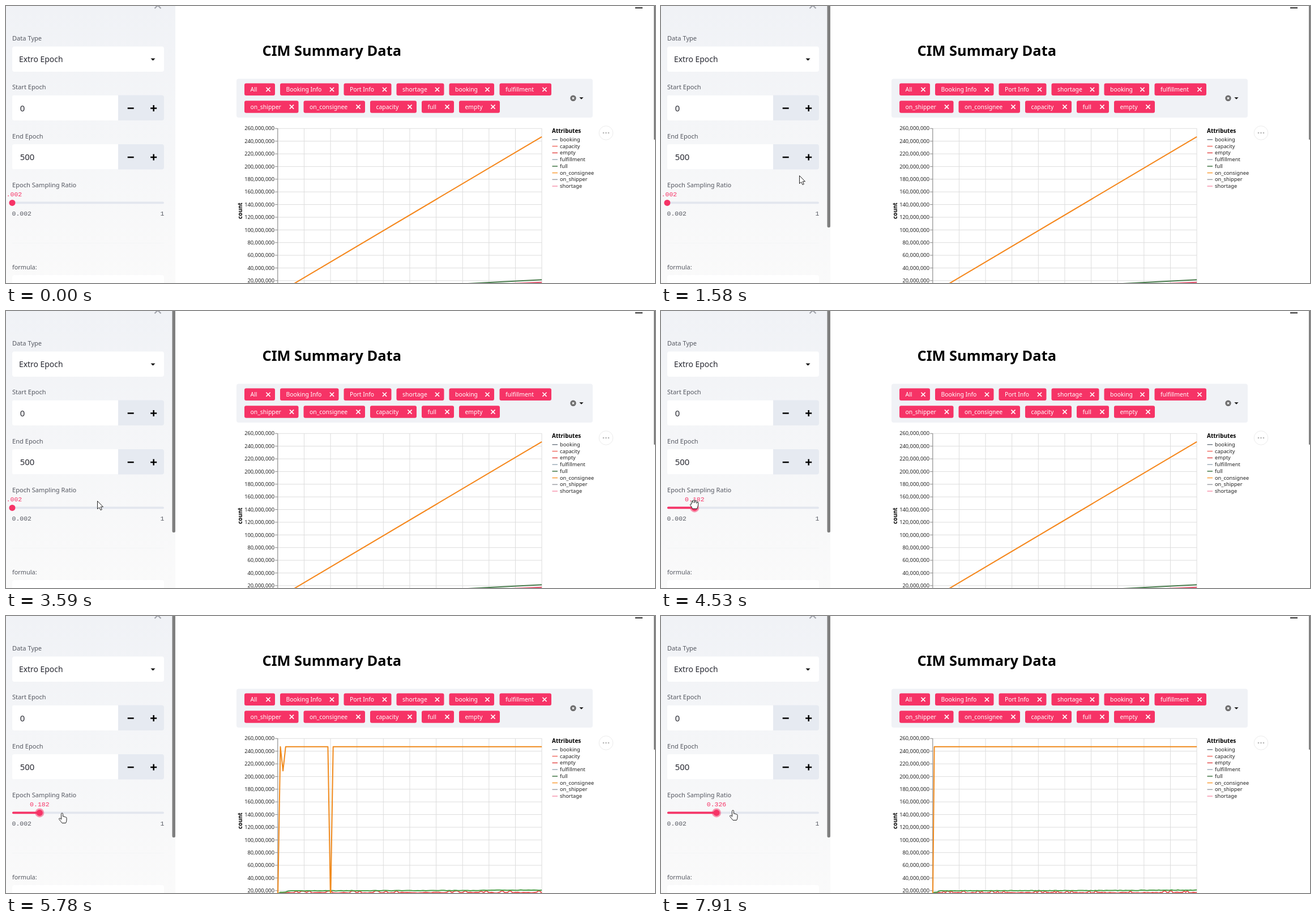
An HTML page that plays this animation: 1146 px wide and 489 px high, repeating every 8 s.

```html
<!DOCTYPE html>
<html lang="en">
<head>
<meta charset="utf-8">
<title>Summary dashboard</title>
<style>
html, body { margin: 0; width: 100%; height: 100%; overflow: hidden; background: #fff; }
svg { display: block; width: 100vw; height: 100vh; font-family: "Noto Sans", "Open Sans", sans-serif; }
.mono { font-family: "Liberation Mono", "DejaVu Sans Mono", monospace; }
</style>
</head>
<body>
<svg id="stage" viewBox="0 0 1146 489" preserveAspectRatio="none">
  <defs>
    <linearGradient id="side" x1="0" y1="0" x2="0" y2="1">
      <stop offset="0" stop-color="#f0f2f6"/><stop offset="1" stop-color="#fafafa"/>
    </linearGradient>
  </defs>
  <g id="page"></g>
  <g id="plot" fill="none" stroke-width="2" stroke-linejoin="round"></g>
  <g id="slider"></g>
  <g id="running"></g>
  <rect id="sidebarScroll" x="293.5" y="-6" width="5.5" height="397" rx="2.5" fill="#7f7f7f"/>
  <path id="cursor" stroke="#222" stroke-width="1" stroke-linejoin="round" fill="#fff"/>
</svg>
<script>
const LOOP = 8000;
const PINK = "#f63366";
const $ = id => document.getElementById(id);

// Markup helpers
const rect = (x, y, w, h, fill, r = 0) =>
  `<rect x="${x}" y="${y}" width="${w}" height="${h}" rx="${r}" fill="${fill}"/>`;
const line = (x1, y1, x2, y2, stroke, w = 1) =>
  `<path d="M${x1} ${y1}L${x2} ${y2}" stroke="${stroke}" stroke-width="${w}"/>`;
const text = (x, y, size, fill, s, more = "") =>
  `<text x="${x}" y="${y}" font-size="${size}" fill="${fill}" ${more}>${s}</text>`;
const cross = (x, y, r, stroke, w) =>
  line(x - r, y - r, x + r, y + r, stroke, w) + line(x - r, y + r, x + r, y - r, stroke, w);
const caret = (x, y, r) => `<path d="M${x - r} ${y - r / 2}h${2 * r}l${-r} ${r}z" fill="#111"/>`;

function numberInput(y, label, value) {
  const mid = y + 23;
  return text(11, y - 10.5, 11.1, "#555861", label)
    + rect(11, y, 268, 44.5, "#e6eaf1", 4)
    + `<path d="M198 ${y}H14q-3 0 -3 3v38.5q0 3 3 3H198z" fill="#fff"/>`
    + text(24.7, y + 28, 14.9, "#262730", value)
    + line(214.7, mid, 225.7, mid, "#000", 2.5)
    + line(255.2, mid, 266.2, mid, "#000", 2.5)
    + line(260.7, mid - 5.5, 260.7, mid + 5.5, "#000", 2.5);
}

function sidebar() {
  return rect(0, 0, 299, 489, "url(#side)")
    + `<path d="M262.5 4.300L268 -1.200L273.5 4.300" fill="none" stroke="#a3a6ad" stroke-width="2.2"/>`
    + text(11, 61, 11.1, "#555861", "Data Type")
    + rect(11, 71.5, 268, 44.5, "#fff", 4)
    + text(23, 99, 13.9, "#262730", "Extro Epoch")
    + caret(259.5, 94.5, 4)
    + numberInput(157.5, "Start Epoch", "0")
    + numberInput(244, "End Epoch", "500")
    + text(11, 319.5, 11.1, "#555861", "Epoch Sampling Ratio")
    + text(10.5, 370, 11.5, "#555861", "0.002", 'class="mono"')
    + text(279.5, 370, 11.5, "#555861", "1", 'class="mono" text-anchor="end"')
    + line(11, 418.5, 279, 418.5, "#f4f5f6")
    + text(11, 464.5, 10.9, "#555861", "formula:")
    + rect(11, 475, 268, 30, "#fff", 4);
}

function tag([x, right, label], top) {
  return rect(x, top, right - x, 21.5, PINK, 3)
    + text(x + 10.5, top + 14.5, 10.4, "#fff", label, 'font-weight="500"')
    + cross(right - 12, top + 10.8, 3.6, "#fff", 1.6);
}

const tagRows = [
  [[421, 475, "All"], [484, 587.5, "Booking Info"], [596.5, 680.5, "Port Info"],
   [689.5, 773.5, "shortage"], [782.5, 862, "booking"], [871.5, 963, "fulfillment"]],
  [[421, 516.5, "on_shipper"], [525.5, 634, "on_consignee"], [643, 725, "capacity"],
   [734, 791, "full"], [800, 872, "empty"]]
];

function filters() {
  return rect(407, 128.5, 629, 68.5, "#f0f2f6", 4)
    + tagRows.map((row, i) => row.map(t => tag(t, 136.5 + i * 30.7)).join("")).join("")
    + `<circle cx="1001.5" cy="162.7" r="5.2" fill="#6c6c6c"/>`
    + cross(1001.5, 162.7, 1.8, "#fff", 1.3)
    + caret(1016, 163, 3.6);
}

// Chart geometry: values are in millions
const LEFT = 479.8, WIDE = 466.3, ZERO = 507.2, UNIT = 22.38 / 20;
const chartY = v => ZERO - v * UNIT;

const legend = [
  ["booking", "#7d868f"], ["capacity", "#f0736a"], ["empty", "#e45756"], ["fulfillment", "#a3b2bd"],
  ["full", "#4a7d4e"], ["on_consignee", "#f9a13f"], ["on_shipper", "#a3a5ab"], ["shortage", "#f79db4"]
];

function chartFrame() {
  let s = "";
  for (let i = 0; i <= 10; i++) {
    const x = LEFT + i * WIDE / 10;
    s += line(x, 216, x, 489, "#ddd");
  }
  for (let v = 20; v <= 260; v += 20) {
    const y = chartY(v);
    s += line(LEFT, y, LEFT + WIDE, y, "#ddd") + line(475, y, LEFT, y, "#888")
      + text(474, y + 3.2, 9.3, "#222", v + ",000,000", 'text-anchor="end"');
  }
  s += line(LEFT, 216, LEFT, 489, "#888")
    + text(0, 0, 10, "#000", "count",
      'font-weight="700" text-anchor="middle" transform="translate(416.5 361.5) rotate(-90)"')
    + text(964, 224, 10, "#000", "Attributes", 'font-weight="700"');
  legend.forEach(([name, color], i) => {
    const y = 235.8 + i * 11.75;
    s += line(964.5, y, 974, y, color, 1.6) + text(978, y + 3.1, 9.3, "#222", name);
  });
  s += `<circle cx="1059.5" cy="224" r="12.3" fill="#fff" stroke="#ececec"/>`;
  for (const x of [1055, 1059.5, 1064]) s += `<circle cx="${x}" cy="224" r="1.3" fill="#b4b4b4"/>`;
  return s;
}

$("page").innerHTML = rect(0, 0, 1146, 489, "#fff") + sidebar()
  + text(452.5, 88, 25.4, "#000", "CIM Summary Data", 'font-weight="700"')
  + filters() + chartFrame()
  + line(1111, 3.3, 1124, 3.3, "#111", 1.8)
  + rect(1144, -4, 4, 240, "#7f7f7f", 1);

$("running").innerHTML =
  `<path d="M938 4.500h5l2.500 -3.500M940 -1l5 2l4 1v5M945 -2l5 2" fill="none" stroke="#9a9a9a" stroke-width="1.5"/>`
  + text(965, 3.5, 11.1, "#b3b3b3", "RUNNING...")
  + `<rect x="1033.5" y="-14" width="58" height="23" rx="3" fill="#fff" stroke="#ededed"/>`
  + text(1051, 3, 10.8, "#555861", "Stop");

const noise = (i, seed) => {
  const n = Math.sin(i * 12.9898 + seed * 78.233) * 43758.5453;
  return n - Math.floor(n);
};

function series(count, value, color) {
  let d = "";
  for (let i = 0; i <= count; i++)
    d += (i ? "L" : "M") + (LEFT + i * WIDE / count).toFixed(1) + " " + chartY(value(i, i / count)).toFixed(1);
  return `<path d="${d}" stroke="${color}"/>`;
}

function sampledPlot(count, dips) {
  const empty = (i, p) => i && 16 + noise(i, 2) * 1.2 + (noise(i, 5) > .86 ? 2.6 : 0) + p * .4;
  const full = (i, p) => i === 0 ? 15
    : i < 4 ? 17 + noise(i, 3) : 19.3 + noise(i, 1) * .7 + (p > .78 ? 1.1 : p * .8);
  const consignee = i => i === 0 ? 0 : i in dips ? dips[i] : 247;
  return series(count, empty, "#e45756") + series(count, full, "#4a9f48")
    + series(count, consignee, "#f08a1d");
}

const plots = [
  series(1, i => i * 17.4, "#e0506a") + series(1, i => i * 21.4, "#4a7d4e")
    + series(1, i => i * 247, "#f5861a"),
  sampledPlot(100, { 2: 209, 20: 0 }),
  sampledPlot(167, {})
];

function drawSlider(value, fillTo, active) {
  const at = v => 11 + 268 * (v - .002) / .998;
  const x = at(value);
  return rect(11, 345.6, 268, 3.6, "#e2e6ee", 1.8)
    + rect(11, 345.6, at(fillTo) - 11, 3.6, PINK, 1.8)
    + (active ? `<circle cx="${x}" cy="347.4" r="8" fill="${PINK}" opacity=".5"/>` : "")
    + `<circle cx="${x}" cy="347.4" r="5.5" fill="${PINK}"/>`
    + text(x, 335.5, 11.5, PINK, value.toFixed(3), 'class="mono" text-anchor="middle"');
}

const shapes = {
  arrow: "M.5 .5V14.500L3.700 11.700L6 16.500L8.300 15.500L6.200 10.800H10.500Z",
  hand: "M-1.500 11V1.500Q-1.500 0 0 0T1.500 1.500V6Q3 5 4 6.500Q5.500 5.800 6 7.200Q8 6.800 8 8.500V12Q8 15 6.500 17.500H0Q-2 15 -5.500 10.500Q-5.500 8.500 -3.500 9.200Z",
  grab: "M-3.500 8Q-5 4 -7.500 1.500Q-7.500 -1 -5 0L-5.500 -4.500Q-4.500 -6.500 -3 -5L-2.500 -2V-6.500Q-1 -8.500 .5 -6.500V-2L1.500 -6Q3.200 -7.300 4 -5.500V-1.500L5 -3.500Q7 -4.200 7 -2Q7 3 4.500 8Z"
};

// Pointer moves: start, end, steps, shape, from x, y, to x, y
const moves = [
  [440, 440, 1, "arrow", 1114, 483, 1114, 483],
  [590, 750, 2, "arrow", 1010, 360, 740, 211],
  [830, 990, 2, "arrow", 500, 235, 300, 321],
  [1360, 1420, 1, "arrow", 275, 311, 245, 299],
  [1580, 1580, 1, "arrow", 244, 299, 244, 299],
  [2980, 3160, 2, "arrow", 310, 315, 338, 318],
  [3230, 3670, 6, "arrow", 330, 320, 76, 342],
  [3750, 3910, 2, "hand", 62, 344, 59, 342],
  [4310, 4310, 1, "grab", 59, 341, 59, 341],
  [5140, 5780, 8, "hand", 59, 342, 99, 348],
  [6170, 6170, 1, "grab", 99, 356, 99, 356],
  [6390, 6550, 2, "hand", 99, 348, 110, 349],
  [6630, 6850, 3, "arrow", 118, 350, 138, 351],
  [6960, 7020, 1, "arrow", 205, 354, 251, 356],
  [7310, 7610, 4, "arrow", 236, 355, 168, 351],
  [7690, 7910, 3, "hand", 150, 348, 127, 343]
];

function pointer(t) {
  const move = moves.filter(m => m[0] <= t).pop();
  if (!move) return null;
  const [start, end, steps, shape, x0, y0, x1, y1] = move;
  const raw = end > start ? Math.min(1, (t - start) / (end - start)) : 1;
  const p = Math.floor(raw * steps + 1e-6) / steps;
  return { shape, x: x0 + (x1 - x0) * p, y: y0 + (y1 - y0) * p };
}

const show = (id, on) => $(id).setAttribute("visibility", on ? "visible" : "hidden");
const pick = (t, first, second) => t < first ? 0 : t < second ? 1 : 2;
const within = (t, a, b) => t >= a && t < b;
const ratios = [.002, .182, .326];
const shown = {};

// Rewrites a group only when its state changes
function update(id, key, markup) {
  if (shown[id] === key) return;
  shown[id] = key;
  $(id).innerHTML = markup();
}

function draw(t) {
  const chart = pick(t, 4900, 6700);
  const value = pick(t, 4380, 6170);
  const fill = pick(t, 4530, 6390);
  update("plot", chart, () => plots[chart]);
  update("slider", value + "/" + fill, () => drawSlider(ratios[value], ratios[fill], value > 0));
  show("running", within(t, 4680, 5220) || within(t, 6540, 6960));
  show("sidebarScroll", t >= 1360 && !within(t, 3090, 3380));
  const at = pointer(t);
  show("cursor", at);
  if (at) {
    $("cursor").setAttribute("d", shapes[at.shape]);
    $("cursor").setAttribute("transform", `translate(${Math.round(at.x)} ${Math.round(at.y)})`);
  }
}

function tick() {
  draw(performance.now() % LOOP);
  requestAnimationFrame(tick);
}
tick();
</script>
</body>
</html>
```
